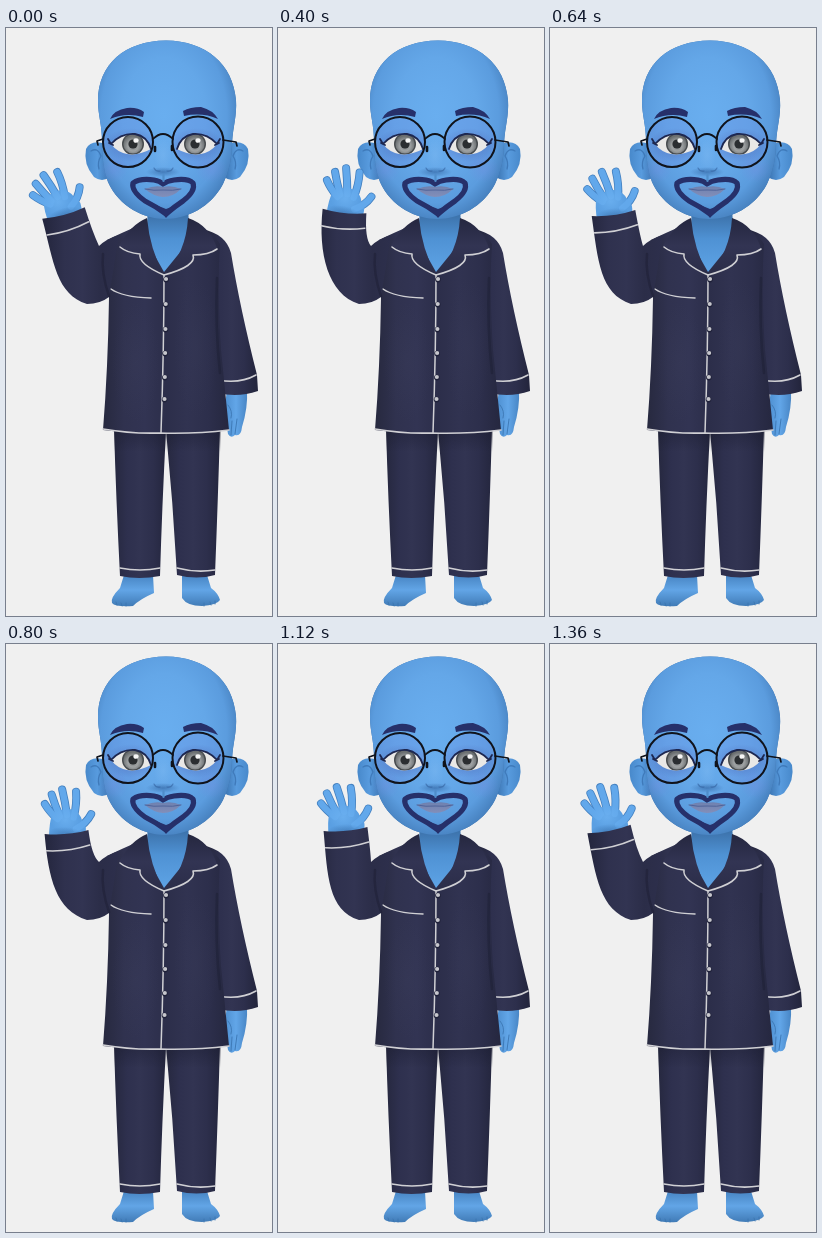
Animation, 266 px wide and 588 px high, one loop 1.44 s. Source, as an HTML page with a canvas:

```html
<!DOCTYPE html>
<html lang="en">
<head>
<meta charset="utf-8">
<title>Waving figure</title>
<style>
  html, body { margin: 0; width: 100%; height: 100%; overflow: hidden; background: #f0f0f0; }
  canvas { display: block; width: 266px; height: 588px; }
</style>
</head>
<body>
<canvas id="stage" width="266" height="588"></canvas>
<script>
const ctx = document.getElementById('stage').getContext('2d');
const LOOP = 1440, STEP = 80;
const PIPING = '#d0d0d4', BEARD = '#26306a', BLACK = '#10131b';
const CLOTH = ['#26283f', '#2e304e', '#323452', '#2d2f4c', '#24263e'];

// time, cuff x, cuff y, cuff tilt, hand lean (degrees)
const WAVE = [
  [0, 57.5, 185, -15, -17], [240, 67.5, 184.5, -4, -1], [320, 70, 184, 1, 9],
  [400, 66.5, 183, 6, 13], [500, 58, 187, -8, 2], [560, 56, 187, -14, -14],
  [640, 63.5, 185, -8, -5], [720, 67, 184, -2, 8], [800, 60.5, 188, -5, 5],
  [920, 53, 189, -17, -20], [1040, 61, 186, -10, -8], [1120, 67.5, 185, -5, -1],
  [1200, 68, 184, 1, 11], [1280, 61, 186, -4, 9], [1360, 59, 185, -11, -1]
];

function pose(t) {
  const i = Math.max(1, WAVE.findIndex(k => k[0] >= t));
  const a = WAVE[i - 1], b = WAVE[i], p = (t - a[0]) / (b[0] - a[0]);
  return a.map((v, j) => v + (b[j] - v) * p).slice(1);
}

function fill(d, style) {
  ctx.fillStyle = style;
  ctx.fill(new Path2D(d));
}

function line(d, style, width) {
  ctx.strokeStyle = style;
  ctx.lineWidth = width;
  ctx.stroke(new Path2D(d));
}

function oval(x, y, rx, ry, style) {
  ctx.fillStyle = style;
  ctx.beginPath();
  ctx.ellipse(x, y, rx, ry, 0, 0, 7);
  ctx.fill();
}

function addStops(g, colors) {
  colors.forEach((c, i) => g.addColorStop(i / (colors.length - 1), c));
  return g;
}

const across = (x0, x1, ...c) => addStops(ctx.createLinearGradient(x0, 0, x1, 0), c);
const down = (y0, y1, ...c) => addStops(ctx.createLinearGradient(0, y0, 0, y1), c);
const glow = (x, y, r, ...c) => addStops(ctx.createRadialGradient(x, y, 0, x, y, r), c);

function shadedOval(x, y, rx, ry, ...colors) {
  ctx.save();
  ctx.translate(x, y);
  ctx.scale(rx, ry);
  oval(0, 0, 1, 1, glow(0, 0, 1, ...colors));
  ctx.restore();
}

const softSpot = (x, y, rx, ry, rgb, alpha) =>
  shadedOval(x, y, rx, ry, `rgba(${rgb},${alpha})`, `rgba(${rgb},0)`);

function drawLegs() {
  const skin = down(545, 579, '#437fbd', '#62a5e6', '#3f79b4');
  fill('M118 547L114 560Q104 570 106 575Q109 579 127 578Q134 571 148 565L147 547Z', skin);
  fill('M176 547L176 570Q181 578 196 578Q211 577 214 572Q212 565 205 560L201 547Z', skin);
  line('M110 574l1 3M115 575l1 3M120 575l0 3M198 575l0 3M204 574l1 3M209 573l0 3', '#3d77b2', 1);
  fill('M108 400Q110 470 114 548Q133 552 154 548Q156 480 160 402Z', across(108, 160, ...CLOTH));
  fill('M160 402Q167 475 171 547Q191 552 209 547Q212 470 214 400Z', across(160, 214, ...CLOTH));
  line('M114 540Q134 544 154 540M171 540Q190 545 209 542', PIPING, 1.5);
  fill('M108 402H215V424H108Z', down(402, 424, 'rgba(24,26,44,.4)', 'rgba(24,26,44,0)'));
}

function drawLoweredArm() {
  fill('M221 362Q218 380 220 393L222 406Q225 411 229 407Q235 409 236 399Q242 380 241 362Z',
    across(218, 242, '#4c8dce', '#62a6e8', '#4683c2'));
  line('M226 393L225 407M231 391L229 406M222 377Q227 383 225 390', '#3f7bb8', 1);
  fill('M196 201Q220 206 225 225Q234 280 251 347L252 363Q232 370 212 365L213 327L205 240Z',
    across(202, 250, ...CLOTH));
  line('M212 352Q234 356 250 347', PIPING, 1.6);
}

function drawTorso() {
  fill('M101 212Q113 206 134 197L184 197Q206 203 214 216Q211 260 215 322L223 402Q160 410 97 402Q102 340 103 270Z',
    across(97, 223, '#27293f', '#30324f', '#323453', '#2c2e4a', '#313351', '#2d2f4c', '#25273f'));
  softSpot(130, 335, 24, 60, '66,69,99', .2);
  softSpot(190, 320, 22, 70, '66,69,99', .18);
  line('M211 250Q209 300 214 345', 'rgba(22,24,42,.3)', 2.5);
  line('M158 247Q158 320 155 405', PIPING, 1.5);
  line('M97 401Q126 406 154 405Q190 406 223 402', PIPING, 1.6);
  line('M105 261Q116 269 145 270', PIPING, 1.5);
  [251, 276, 301, 325, 349, 371].forEach((y, i) => {
    const x = 160 - i * .3;
    oval(x, y + .6, 2.8, 2.8, '#1f2139');
    oval(x, y, 2.1, 2.1, '#c6c6cc');
  });
}

function drawNeck() {
  fill('M142 180L140 212L158 244L184 212L182 180Z', down(180, 242, '#37699f', '#4f92d4', '#5da2e4'));
  const cloth = down(190, 246, '#25273f', '#323453', '#2b2d48');
  fill('M141 190Q124 197 113 218Q120 225 133 226Q134 236 158 247Q144 222 141 190Z', cloth);
  fill('M182 190Q203 197 211 220Q204 226 187 227Q190 237 158 247Q180 225 182 190Z', cloth);
  line('M114 219Q121 225 134 226Q132 236 158 247Q191 238 187 227Q203 227 211 221', PIPING, 1.6);
}

function drawHand(x, y, lean) {
  ctx.save();
  ctx.translate(x, y);
  ctx.rotate(lean * Math.PI / 180);
  const fingers = ['M-10 -12Q-19 -19 -24 -26', 'M-8 -15Q-14 -26 -18 -36',
    'M-1 -17Q-4 -30 -8 -42', 'M6 -15Q8 -29 6 -41', 'M9 -4Q19 -10 23 -20'];
  fingers.forEach(d => line(d, '#427fbf', 8));
  fill('M-17 6Q-18 -8 -16 -15Q-8 -24 2 -23Q12 -21 15 -12Q22 -7 17 6Z', '#5a9fe2');
  fingers.forEach(d => line(d, '#62a8eb', 6.4));
  softSpot(-2, -12, 15, 13, '108,177,241', .8);
  softSpot(0, 4, 20, 9, '47,97,153', .55);
  ctx.restore();
}

function drawWavingArm(t) {
  const [x, y, tilt, lean] = pose(t);
  const a = tilt * Math.PI / 180, c = Math.cos(a), s = Math.sin(a);
  // u runs along the cuff, v towards the elbow
  const at = (u, v) => `${x + u * c - v * s} ${y + u * s + v * c}`;
  drawHand(x, y, lean);
  fill(`M${at(-22, 0)}C${at(-22, 45)} 50 266 81 276Q94 276 103 269L113 207Q100 211 93 218Q${at(23, 26)} ${at(22, 0)}Q${at(0, 4)} ${at(-22, 0)}Z`,
    across(40, 113, '#25273f', '#2f314e', '#323452', '#2b2d48', '#2d2f4c'));
  line(`M${at(-21.500, 17)}Q${at(0, 20)} ${at(22, 15)}`, PIPING, 1.6);
  line('M97 226Q95 245 103 268', 'rgba(22,24,42,.35)', 2.5);
}

function drawEar(x, flip) {
  ctx.save();
  ctx.translate(x, 0);
  ctx.scale(flip, 1);
  fill('M6 116Q-9 111 -14 121Q-17 136 -6 149Q2 155 10 149Z',
    across(-15, 10, '#4788ca', '#589bde', '#3972af'));
  line('M-9 123Q-2 119 1 128Q-3 134 -1 141', '#3f7aba', 1.3);
  ctx.restore();
}

function drawEye(x, irisX, flip) {
  ctx.save();
  ctx.translate(x, 117);
  ctx.scale(flip, 1);
  softSpot(0, 0, 27, 17, '65,70,150', .4);
  const lid = 'M-20 -1Q-10 -12 4 -11Q16 -9 20 4Q7 11 -4 9Q-14 7 -20 -1Z';
  fill(lid, '#e9e8e6');
  ctx.save();
  ctx.clip(new Path2D(lid));
  const ix = (irisX - x) * flip;
  oval(ix, -1, 11, 11, '#474b4e');
  oval(ix, -1, 9.6, 9.6, glow(ix, 1, 10, '#74787a', '#a0a3a4', '#6a6e70'));
  oval(ix, -1, 4.6, 4.6, '#2b2e31');
  oval(ix + 3 * flip, -4.500, 2.6, 2.3, '#f6f6f6');
  ctx.restore();
  line('M-23 -6L-20 -1Q-10 -12 4 -11Q16 -9 20 4M-22 -2L-18 0', '#1d2750', 1.8);
  ctx.restore();
}

function drawFace() {
  fill('M104 91Q108 82 121 80Q131 79 138 84L137 89Q120 84 104 91Z', BEARD);
  fill('M212 91Q207 82 195 79Q184 79 177 83L178 88Q196 84 212 91Z', BEARD);

  softSpot(157, 127, 9, 16, '125,185,242', .45);
  softSpot(157, 144, 17, 5, '35,80,140', .5);
  line('M148 140Q150 144 154 143M161 143Q165 144 167 140', 'rgba(37,78,137,.45)', 1.2);

  line('M127 155Q134 150 148 152Q154 153 157 156Q161 153 168 152Q182 150 187 155Q190 163 177 173Q168 179 160 186Q151 179 139 173Q125 163 127 155Z', BEARD, 5.2);
  fill('M150 177L160 190L171 177L160 181Z', BEARD);
  line('M157.500 147V153', '#4f8dca', 2.2);
  fill('M139 161Q149 157 157 159Q166 157 175 161Q167 169 157 169Q147 168 139 161Z',
    down(157, 170, '#6c7fae', '#8590ba'));
  line('M139 161Q148 163 157 162Q167 163 175 161', '#4f6399', 1);
}

function drawGlasses() {
  const lenses = [[122, 25], [192, 25.500]];
  lenses.forEach(([x, r]) => oval(x, 114, r, r, 'rgba(105,125,220,.2)'));
  drawEye(125, 127, 1);
  drawEye(191, 189, -1);
  for (const [x, r] of lenses) {
    ctx.strokeStyle = BLACK;
    ctx.lineWidth = 2;
    ctx.beginPath();
    ctx.arc(x, 114, r, 0, 7);
    ctx.stroke();
  }
  line('M147 111Q157 101 167 111M97 111L91 113L92 117M217 112L230 114L231 118', BLACK, 1.7);
  line('M149 119V123M166 118V122', BLACK, 2.6);
}

function drawHead() {
  drawEar(94, 1);
  drawEar(228, -1);
  ctx.save();
  ctx.clip(new Path2D('M160 12.500C119 13 92 36 92 73C92 88 96 96 96 115Q96 139 102 154C113 179 139 191 159 191C181 191 205 179 217 156Q226 138 226 115C227 98 231 88 230 72C227 36 200 13 160 12.500Z'));
  ctx.fillStyle = '#3d74b0';
  ctx.fillRect(80, 0, 170, 200);
  shadedOval(158, 88, 84, 116, '#69aeef', '#67abec', '#64a7e8', '#5b9cde', '#3d74b0');
  ctx.restore();
  softSpot(108, 141, 14, 14, '115,142,224', .4);
  softSpot(205, 141, 16, 14, '115,142,224', .4);
  drawFace();
  drawGlasses();
}

function draw(now) {
  const t = Math.floor(now % LOOP / STEP) * STEP;
  ctx.fillStyle = '#f0f0f0';
  ctx.fillRect(0, 0, 266, 588);
  ctx.lineCap = ctx.lineJoin = 'round';
  drawLegs();
  drawLoweredArm();
  drawTorso();
  drawNeck();
  drawHead();
  drawWavingArm(t);
}

const start = performance.now();
function tick() {
  draw(performance.now() - start);
  requestAnimationFrame(tick);
}
tick();
</script>
</body>
</html>
```
